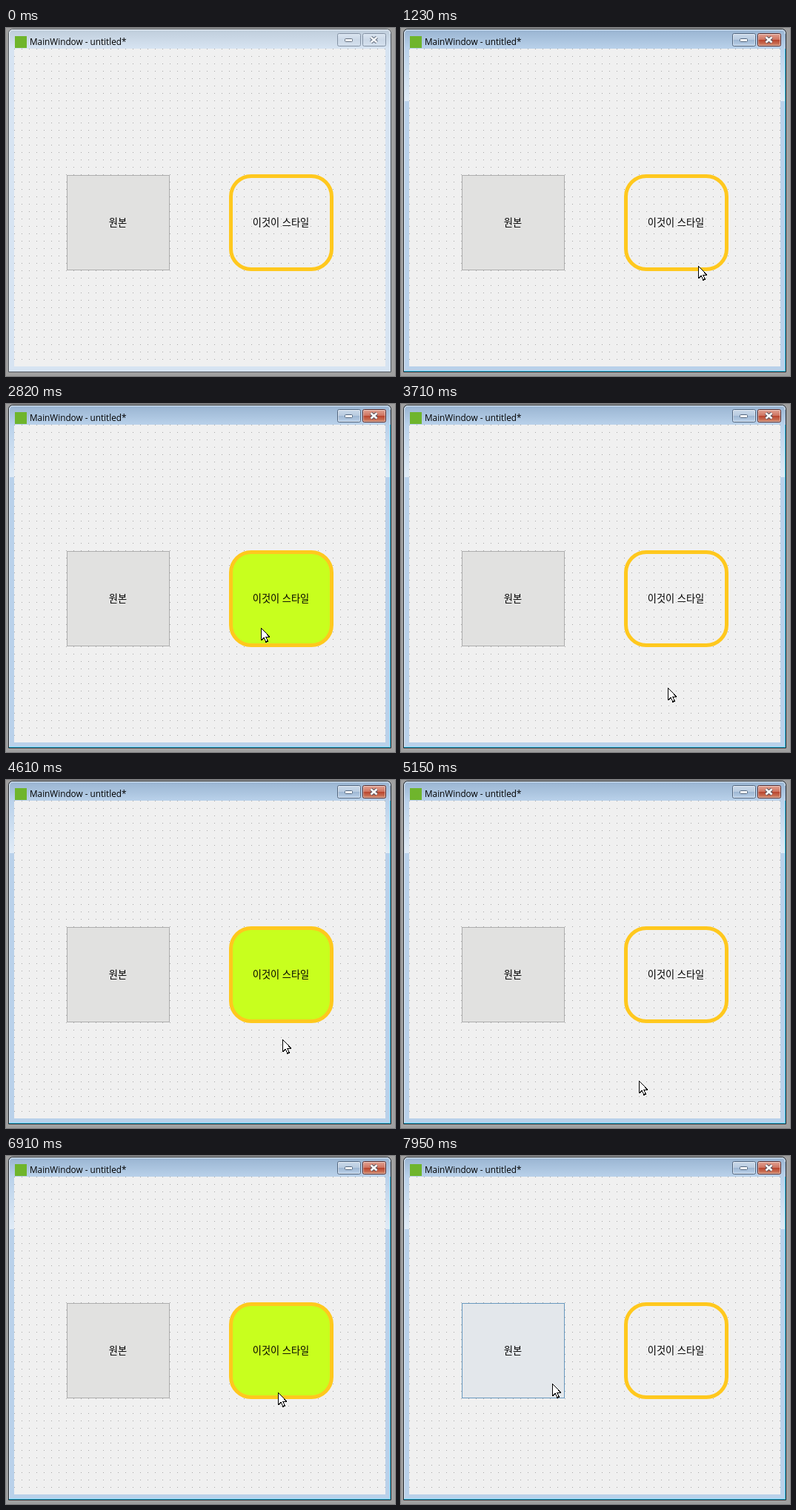
Animation of 525 by 471 pixels, one loop 8 s. Source, as an HTML page:

```html
<!DOCTYPE html>
<html lang="ko">
<head>
<meta charset="utf-8">
<title>Button styles</title>
<style>
  html, body { margin: 0; width: 100%; height: 100%; overflow: hidden; background: #a0a0a0; }
  svg { display: block; }
  .crisp { shape-rendering: crispEdges; }
  .title { font: 11.75px "Open Sans", "Noto Sans", sans-serif; }
  .label { font: 13.2px "Noto Sans CJK KR", "Noto Sans CJK", sans-serif; text-anchor: middle; }
</style>
</head>
<body>
<svg width="525" height="471" viewBox="0 0 525 471">
  <defs>
    <linearGradient id="idleBar" x2="0" y2="1">
      <stop stop-color="#bfcddb"/><stop offset="1" stop-color="#d7e4f2"/>
    </linearGradient>
    <linearGradient id="liveBar" x2="0" y2="1">
      <stop stop-color="#99b4d1"/><stop offset="1" stop-color="#b9d1ea"/>
    </linearGradient>
    <linearGradient id="shine" x2="0" y2="1">
      <stop stop-color="#b9d1ea"/><stop offset="1" stop-color="#e0ebf6"/>
    </linearGradient>
    <linearGradient id="idleBtn" x2="0" y2="1">
      <stop stop-color="#dce6f1"/><stop offset=".5" stop-color="#cbd8e7"/><stop offset="1" stop-color="#d5e1ee"/>
    </linearGradient>
    <linearGradient id="liveBtn" x2="0" y2="1">
      <stop stop-color="#ccdaea"/><stop offset=".48" stop-color="#b8cbe0"/>
      <stop offset=".5" stop-color="#9db6d2"/><stop offset="1" stop-color="#bcd2ea"/>
    </linearGradient>
    <linearGradient id="closeBtn" x2="0" y2="1">
      <stop stop-color="#e3a596"/><stop offset=".48" stop-color="#cf7461"/>
      <stop offset=".5" stop-color="#b8412b"/><stop offset="1" stop-color="#d28a6c"/>
    </linearGradient>
    <pattern id="grid" x="11" y="28" width="10" height="10" patternUnits="userSpaceOnUse">
      <rect width="1" height="1" fill="#a6a6a6"/>
    </pattern>
    <path id="frame" d="M3.5 465.5V8Q3.5 1.5 10 1.5H513Q519.5 1.5 519.5 8V465.5Z"/>
    <path id="bar" d="M4 28V8Q4 2 10 2H513Q519 2 519 8V28Z"/>
    <path id="rim" d="M4.5 464.5V8Q4.5 2.5 10 2.5H513Q518.5 2.5 518.5 8" fill="none"/>
    <path id="cross" d="M492.5 12.5L500.5 19.5M500.5 12.5L492.5 19.5"/>
    <rect id="button" width="31" height="17" rx="2"/>
    <rect id="bevel" x="1" y="1" width="29" height="15" rx="1" fill="none" stroke="#fff" stroke-opacity=".45"/>
    <rect id="dash" x="457.5" y="14.5" width="10" height="4" rx="1"/>
  </defs>

  <g id="idle">
    <use href="#frame" fill="#d7e4f2" stroke="#50565e"/>
    <use href="#bar" fill="url(#idleBar)"/>
    <use href="#rim" stroke="#eef4fa"/>
    <g fill="url(#idleBtn)" stroke="#8593a5">
      <use href="#button" x="447.5" y="7.5"/>
      <use href="#button" x="481.5" y="7.5"/>
    </g>
    <use href="#dash" fill="#f4f7fa" stroke="#657080"/>
    <use href="#cross" stroke="#657080" stroke-width="4.6"/>
    <use href="#cross" stroke="#f4f7fa" stroke-width="2.4"/>
  </g>

  <g id="live" opacity="0">
    <use href="#frame" fill="#b9d1ea" stroke="#20262d"/>
    <use href="#bar" fill="url(#liveBar)"/>
    <path class="crisp" d="M4 28H11V99H4ZM512 28H519V99H512Z" fill="url(#shine)"/>
    <use href="#rim" stroke="#e6f0fa"/>
    <path d="M4 464.5H518.5V28" fill="none" stroke="#36c8ee"/>
    <use href="#button" x="447.5" y="7.5" fill="url(#liveBtn)" stroke="#52667f"/>
    <use href="#button" x="481.5" y="7.5" fill="url(#closeBtn)" stroke="#5a2a2a"/>
    <use href="#bevel" x="447.5" y="7.5"/>
    <use href="#bevel" x="481.5" y="7.5"/>
    <use href="#dash" fill="#fff" stroke="#52667f"/>
    <use href="#cross" stroke="#56525d" stroke-width="4.6"/>
    <use href="#cross" stroke="#fff" stroke-width="2.6"/>
  </g>

  <rect class="crisp" x="12" y="11" width="16" height="16" fill="#6fb52c"/>
  <text class="title" x="32" y="23">MainWindow - untitled*</text>

  <g class="crisp">
    <rect x="11" y="28" width="501" height="430" fill="#f0f0f0"/>
    <rect x="11" y="28" width="501" height="430" fill="url(#grid)"/>
  </g>

  <rect id="plain" class="crisp" x="82.5" y="199.5" width="138" height="128"/>
  <text class="label" x="151" y="268">원본</text>
  <rect id="styled" x="303.5" y="200.5" width="136" height="126" rx="27.5" stroke="#ffc81e" stroke-width="5"/>
  <text class="label" x="371" y="268">이것이 스타일</text>

  <path id="cursor" class="crisp" d="M.5 .5V17L4.3 13.4L6.9 19.3L9.3 18.2L6.8 12.4H12Z" fill="#fff" stroke="#000" stroke-linejoin="round"/>
</svg>
<script>
const LOOP = 8000, STEP = 70, OFFSET = 20, FADE = 175;
const $ = id => document.getElementById(id);
const clamp = v => Math.min(1, Math.max(0, v));
const ease = k => k * k * (3 - 2 * k);

// Turning points of the pointer: time, x, y
const turns = [
  [300, 530, 430], [790, 470, 369], [1770, 295, 250], [2050, 310, 306],
  [2330, 325, 200], [2820, 344, 303], [3030, 436, 300], [3310, 280, 195],
  [3800, 380, 431], [4500, 408, 290], [4570, 373, 351], [5060, 335, 419],
  [5480, 150, 260], [5620, 210, 300], [5830, 260, 351], [6810, 346, 314],
  [6880, 367, 320], [7650, 295, 407], [7930, 204, 308]
];

function pointAt(t) {
  const i = turns.findIndex(p => p[0] > t);
  if (i < 1) return turns.at(i).slice(1);
  const [t0, ...from] = turns[i - 1], [t1, ...to] = turns[i];
  const k = ease((t - t0) / (t1 - t0));
  return from.map((v, n) => Math.round(v + (to[n] - v) * k));
}

const within = ([x, y], left, right) => x >= left && x < right && y >= 198 && y < 329;

// Hover reacts one step after the pointer; the plain button fades.
const poses = [];
let glow = 0, last = pointAt(0);
for (let t = OFFSET; t < LOOP; t += STEP) {
  const pos = pointAt(t);
  glow = clamp(glow + (within(last, 82, 221) ? 1 : -1) * STEP / FADE);
  poses.push({ pos, glow, hot: within(last, 301, 442) });
  last = pos;
}

const mix = (a, b, k) => `rgb(${a.map((v, i) => Math.round(v + (b[i] - v) * k))})`;

function draw(t) {
  const { pos, glow, hot } = poses[Math.max(0, Math.floor((t - OFFSET) / STEP))];
  $('live').setAttribute('opacity', clamp((t - 260) / 280) * (t >= 330));
  $('plain').setAttribute('fill', mix([225, 225, 224], [229, 241, 251], glow));
  $('plain').setAttribute('stroke', mix([173, 173, 173], [0, 120, 215], glow));
  $('styled').setAttribute('fill', hot ? '#c8ff1e' : 'none');
  $('cursor').setAttribute('transform', `translate(${pos})`);
}

let start;
function tick(now) {
  start ??= now;
  draw((now - start) % LOOP);
  requestAnimationFrame(tick);
}
draw(0);
requestAnimationFrame(tick);
</script>
</body>
</html>
```
